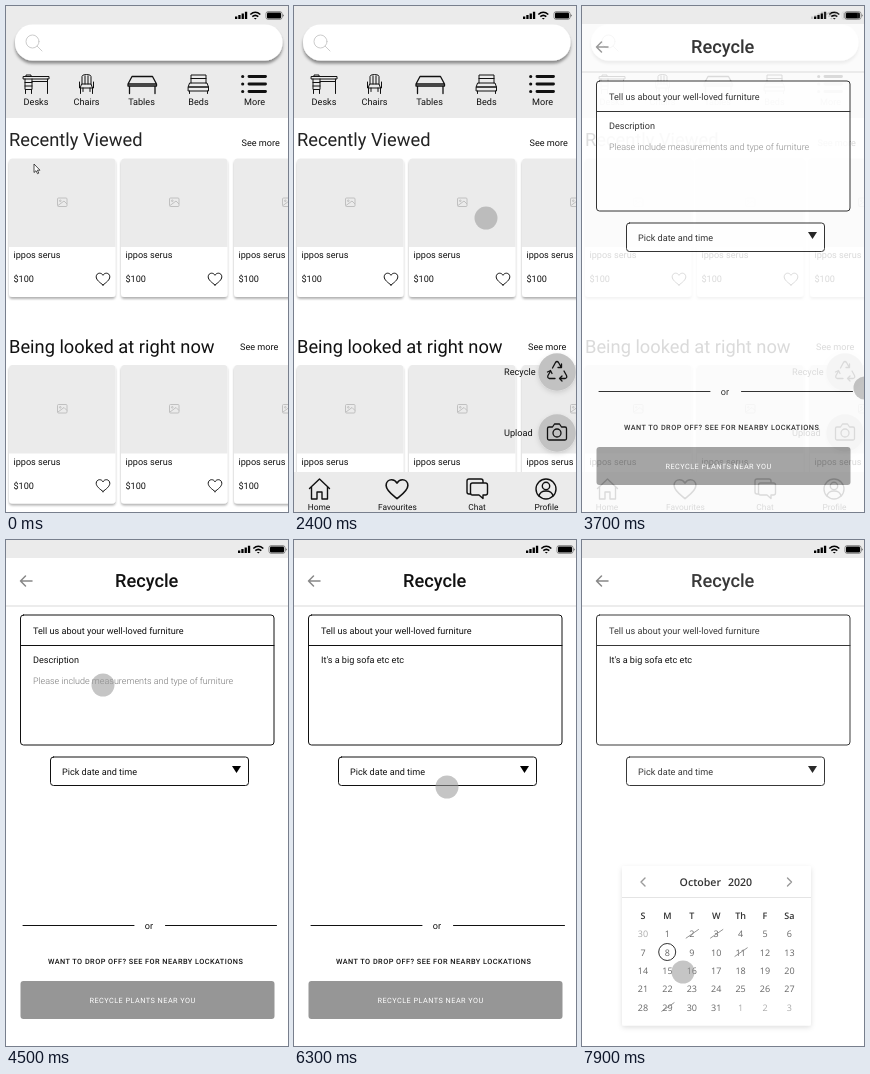
Animation, 282 px wide and 506 px high, one loop 8 s. Source, as an HTML page:

```html
<!DOCTYPE html>
<html lang="en">
<head>
<meta charset="utf-8">
<title>Furniture app walkthrough</title>
<style>
html, body { margin: 0; width: 100%; height: 100%; overflow: hidden; background: #fff; }
svg { display: block; width: 100%; height: 100%; }
text { font: 9.1px Roboto, sans-serif; fill: #111; white-space: pre; text-rendering: geometricPrecision; }
.mid text, text.mid { text-anchor: middle; }
text.head { font-size: 18.3px; }
text.title { font-size: 18.2px; font-weight: 500; }
.nav text { font-size: 8.4px; }
text.caps { font-size: 7.3px; letter-spacing: .46px; }
.line { fill: none; stroke: #111; stroke-width: 1; stroke-linejoin: round; stroke-linecap: round; }
.cal text { font: 9px "Open Sans", sans-serif; fill: #666; text-anchor: middle; }
.cal text.bold { font-weight: 600; fill: #333; }
.cal text.month { font-size: 10.6px; }
.cal text.out { fill: #aaa; }
</style>
</head>
<body>
<svg viewBox="0 0 282 506">
<defs>
  <filter id="shadow" x="-20%" y="-20%" width="140%" height="150%">
    <feDropShadow dx="0" dy="2" stdDeviation="1.3" flood-opacity=".3"/>
  </filter>
  <filter id="deep" x="-20%" y="-20%" width="140%" height="160%">
    <feDropShadow dx="0" dy="3" stdDeviation="1.6" flood-opacity=".42"/>
  </filter>
  <filter id="soft" x="-10%" y="-10%" width="120%" height="125%">
    <feDropShadow dx="0" dy="2" stdDeviation="2.5" flood-opacity=".13"/>
  </filter>
  <g id="status">
    <path d="M229 10.500h2.300v2.500h-2.300zM232.300 9h2.300v4h-2.300zM235.600 7.500h2.300v5.500h-2.300zM238.900 5.800h2.300v7.200h-2.300z"/>
    <path d="M244.300 8.500q5-4.500 10 0M246.300 10.700q3-2.600 6 0" fill="none" stroke="#000" stroke-width="1.6"/>
    <path d="M247.800 11.900h3l-1.500 1.600z"/>
    <rect x="260" y="5.700" width="16" height="7.600" rx="2" fill="#fff" stroke="#555" stroke-width=".7"/>
    <rect x="261" y="6.600" width="14" height="5.800" rx="1"/>
    <path d="M276.800 8v3q1.500-1.500 0-3"/>
  </g>
  <path id="heart" class="line" d="M0 6C-3 3.600-6.800 1-6.800-2.200C-6.800-4.400-5.200-5.800-3.400-5.800C-1.900-5.800-.7-5 0-3.700C.7-5 1.900-5.800 3.400-5.800C5.200-5.800 6.800-4.400 6.800-2.200C6.800 1 3 3.600 0 6z"/>
  <g id="card">
    <rect width="106.500" height="138.500" rx="3.500" fill="#fff" filter="url(#shadow)"/>
    <path d="M0 88.500V3.500Q0 0 3.500 0h99.500q3.500 0 3.500 3.500v85z" fill="#ebebeb"/>
    <g fill="none" stroke="#bbb" stroke-width=".9">
      <rect x="48.500" y="39.500" width="9.500" height="8.500" rx="1"/>
      <path d="M49 47l6-4.500 3 3"/><circle cx="51.300" cy="42.300" r=".8"/>
    </g>
    <text x="4.500" y="99.500">ippos serus</text>
    <text x="4.500" y="123.500">$100</text>
    <use href="#heart" x="94" y="120.500"/>
  </g>
  <g id="row">
    <use href="#card" x="3"/><use href="#card" x="115"/><use href="#card" x="228"/>
  </g>
</defs>

<g id="home">
  <rect width="282" height="506" fill="#fff"/>
  <rect width="282" height="112" fill="#ebebeb"/>
  <use href="#status"/>
  <rect x="9" y="18.500" width="267.500" height="36" rx="17.500" fill="#fff" filter="url(#deep)"/>
  <g class="line" style="stroke:#ccc"><circle cx="26.500" cy="35.500" r="6.500"/><path d="M31.200 40.200l4.800 4.800"/></g>
  <g class="line">
    <path d="M17.500 70.500h25.500v2.500h-25.500zM19 73v10.500h7v-10.500M19 76.500h7M19 80h7M19.500 83.500v4M25.500 83.500v4M41.500 73v14.500M26 75.500h15.500M20 70.500v-1.500h5v1.500"/>
    <path d="M76 78v-7.500q0-2 4.500-2t4.500 2v7.500M79 70v8M82 70v8M76 78h9l1.500 4h-12zM73.500 76v6h1M87.500 76v6h-1M74.500 82v5.500M86.500 82v5.500M77 82v3.500M84 82v3.500"/>
    <path d="M126 70.500h20.500l4 7.500h-28.500zM122 78v2h28.500v-2M123.500 80v7.500M149 80v7.500" style="stroke-width:1.300"/>
    <path d="M185 77v-8h15v8M185 72.500h15M184 77h17l1.500 4h-20zM182.500 81h20v4h-20zM183.500 85v2.500M201.500 85v2.500"/>
    <path d="M243 70.500h16.500M243 78h16.500M243 85.500h16.500" style="stroke-width:2.900"/>
    <path d="M236.700 70.500h0M236.700 78h0M236.700 85.500h0" style="stroke-width:3.200"/>
  </g>
  <g class="mid">
    <text x="30" y="98.500">Desks</text><text x="80.500" y="98.500">Chairs</text><text x="135.500" y="98.500">Tables</text>
    <text x="192.500" y="98.500">Beds</text><text x="248.500" y="98.500">More</text>
  </g>
  <text class="head" x="3" y="140" style="fill:#222">Recently Viewed</text>
  <text x="235.500" y="140">See more</text>
  <use href="#row" y="152.500"/>
  <text class="head" x="3" y="347">Being looked at right now</text>
  <text x="234" y="344">See more</text>
  <use href="#row" y="359"/>
</g>

<g id="menu" class="nav">
  <rect y="466" width="282" height="40" fill="#ebebeb"/>
  <g class="line" style="stroke-width:1.400">
    <path d="M15.500 482.500l10-9.500 10 9.500M17.500 481v12h5.500v-7h5v7h5.500v-12"/>
    <use href="#heart" transform="translate(103 483) scale(1.600)"/>
    <path d="M177 488h-2q-2 0-2-2v-11q0-2 2-2h12q2 0 2 2v2M178.500 477h13q2 0 2 2v8q0 2-2 2h-2.500v3.500l-4-3.500h-6.500q-2 0-2-2v-8q0-2 2-2z"/>
    <circle cx="252" cy="483" r="10"/><circle cx="252" cy="480" r="3.700"/><path d="M245 490q1-5 7-5t7 5"/>
  </g>
  <g class="mid">
    <text x="25" y="504">Home</text><text x="103.500" y="504">Favourites</text>
    <text x="183" y="504">Chat</text><text x="252.500" y="504">Profile</text>
  </g>
  <g fill="#c2c2c2" filter="url(#soft)"><circle cx="263" cy="366" r="18.700"/><circle cx="263" cy="427" r="18.700"/></g>
  <text x="210" y="369" style="font-size:9.200px">Recycle</text>
  <text x="210" y="429.500" style="font-size:9.200px">Upload</text>
  <g class="line" style="stroke-width:1.300">
    <path d="M258.500 362l3-5.500q1.500-2 3 0l2.500 4.500M267.500 358v3.500h-3.500M270 365l2.500 4.500q1 2.500-1.500 3h-5.500M268 370l-2.500 2.500 2.500 2.500M261 372.500h-5.500q-2.500-.5-1.500-3l2.500-4.500M253.500 366l3-1.500 1.500 3"/>
    <path d="M255 421h3.500l2-3h5l2 3h3.500q1.500 0 1.500 1.500v10q0 1.500-1.500 1.500h-16q-1.500 0-1.500-1.500v-10q0-1.500 1.500-1.500z"/>
    <circle cx="263" cy="427" r="4"/>
  </g>
</g>

<!-- White field backs that fade in beneath the form -->
<g id="backs" fill="#fff">
  <rect x="14.500" y="75" width="253.500" height="130" rx="3"/>
  <rect x="44.500" y="217" width="198" height="28.500" rx="3"/>
</g>

<g id="form">
  <rect width="282" height="506" fill="#fff"/>
  <rect width="282" height="18" fill="#ebebeb"/>
  <use href="#status" x="3"/>
  <rect y="65" width="282" height="2" fill="#ececec"/>
  <path class="line" d="M26 41h-11.500M19.500 36l-5 5 5 5" style="stroke:#888;stroke-width:1.500"/>
  <g id="fields">
    <text class="title mid" x="140.700" y="47">Recycle</text>
    <g class="line">
      <rect x="14.500" y="75" width="253.500" height="130" rx="3"/><path d="M14.500 105.500h253.500"/>
      <rect x="44.500" y="217" width="198" height="28.500" rx="3"/>
    </g>
    <text x="27" y="94">Tell us about your well-loved furniture</text>
    <text x="56" y="235">Pick date and time</text>
    <path d="M226 226h9l-4.500 7z"/>
  </g>
  <g id="hint">
    <text x="27" y="122.500">Description</text>
    <text x="27" y="144" style="font-size:9px;font-weight:300;fill:#777">Please include measurements and type of furniture</text>
  </g>
  <text id="answer" x="27" y="122.500">It's a big sofa etc etc</text>
  <g id="dropOff">
    <path class="line" d="M17 385.500h111M159.500 385.500h111"/>
    <text class="mid" x="143" y="389">or</text>
    <text class="caps" x="42" y="424" style="font-weight:500">WANT TO DROP OFF? SEE FOR NEARBY LOCKATIONS</text>
    <rect x="14.500" y="441" width="254" height="38" rx="3" fill="#969696"/>
    <text class="caps" x="83.500" y="463" style="fill:#fff">RECYCLE PLANTS NEAR YOU</text>
  </g>
  <g id="calendar" class="cal">
    <rect x="40" y="326" width="189" height="159.500" rx="2" fill="#fff" filter="url(#soft)"/>
    <path d="M40 357.500h189" stroke="#e4e4e4"/>
    <path class="line" d="M63 338l-4 4 4 4M205.500 338l4 4-4 4" style="stroke:#999;stroke-width:1.400"/>
    <text class="bold month" x="118.300" y="345.500">October</text>
    <text class="bold month" x="158" y="345.500">2020</text>
    <g id="days"></g>
    <circle id="ring" cx="85.200" cy="412" r="8.500" fill="none" stroke="#333"/>
  </g>
</g>

<path id="arrow" d="M0 0v8.500l2-1.800 1.500 3 1.300-.6-1.400-2.900h2.600z" fill="#fff" stroke="#222" stroke-width=".8"/>
<circle id="touch" r="11.500" fill="#999" fill-opacity=".57"/>
</svg>
<script>
const $ = id => document.getElementById(id);
const LOOP = 8000;

// Calendar grid: the last day before the month, 31 days, then three more
const colX = c => 61 + 24.4 * c;
const crossed = [2, 3, 11, 29];
let grid = ["S", "M", "T", "W", "Th", "F", "Sa"]
  .map((d, c) => `<text class="bold" x="${colX(c)}" y="379">${d}</text>`).join("");
for (let i = 0; i < 35; i++) {
  const x = colX(i % 7), y = 397.3 + 18.3 * Math.floor(i / 7);
  const out = i < 1 || i > 31;
  grid += `<text class="${out ? "out" : ""}" x="${x}" y="${y}">${i < 1 ? 30 : i > 31 ? i - 31 : i}</text>`;
  if (crossed.includes(i))
    grid += `<path d="M${x - 6} ${y + 1}l13-9" stroke="#888" stroke-width=".9"/>`;
}
$("days").innerHTML = grid;

// Pointer stops: time, x, y
const stops = [
  [0, 28, 158], [100, 47, 164], [250, 47, 164], [500, 148, 242], [850, 148, 242],
  [1120, 40, 175], [1400, 192, 212], [2400, 192, 212], [2620, 163, 330],
  [2850, 235, 480], [3050, 264, 400], [3300, 283, 382], [3750, 283, 382],
  [4350, 97, 145], [5250, 97, 145], [6050, 153, 247], [6400, 153, 247],
  [6850, 137, 326], [7050, 137, 326], [7400, 85, 412], [7650, 85, 412],
  [7900, 101, 432], [LOOP, 101, 432]
];

const ramp = (t, a, b) => Math.max(0, Math.min(1, (t - a) / (b - a)));
const ease = k => k * k * (3 - 2 * k);
const fade = (id, k) => $(id).setAttribute("opacity", k);

function pointer(t) {
  const i = stops.findIndex(s => s[0] > t);
  const [t0, x0, y0] = stops[i - 1], [t1, x1, y1] = stops[i];
  const k = ease(ramp(t, t0, t1));
  return `translate(${x0 + (x1 - x0) * k} ${y0 + (y1 - y0) * k})`;
}

function draw(t) {
  const opened = ramp(t, 3430, 3750), typed = ramp(t, 4750, 5050), picking = ramp(t, 6480, 6800);
  fade("menu", ramp(t, 1550, 2050));
  fade("backs", opened);
  fade("form", opened);
  fade("hint", 1 - typed);
  fade("answer", typed);
  fade("dropOff", 1 - picking);
  fade("calendar", picking);
  fade("ring", ramp(t, 7550, 7850));
  fade("fields", 1 - 0.17 * ramp(t, 7700, 7900));

  const at = pointer(t);
  for (const id of ["arrow", "touch"]) $(id).setAttribute("transform", at);
  fade("arrow", t < 300 ? 1 : 0);
  fade("touch", t < 300 ? 0 : 1);
}

function tick() {
  draw(performance.now() % LOOP);
  requestAnimationFrame(tick);
}
tick();
</script>
</body>
</html>
```
